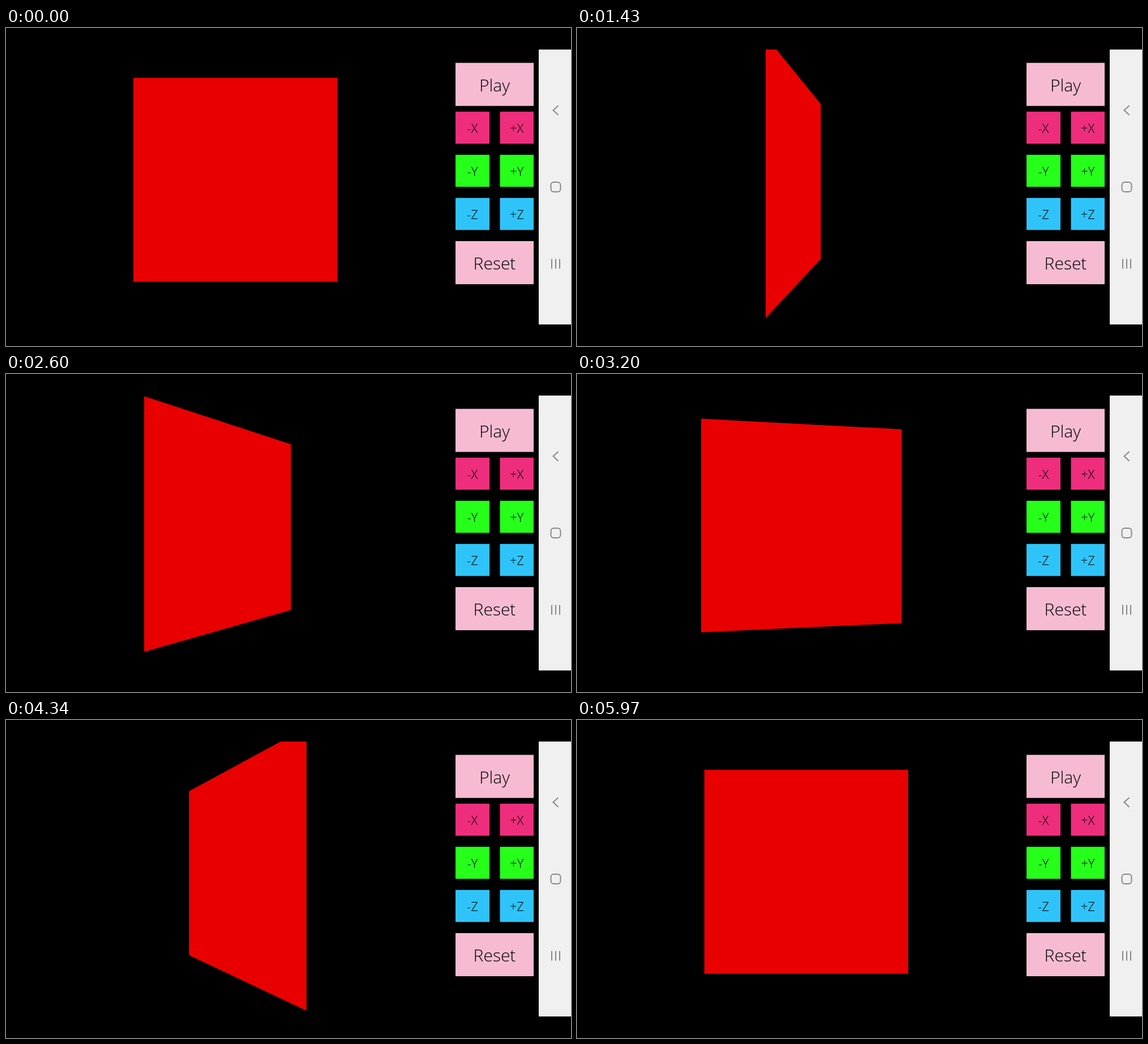
Animation of 998x561 px, one loop 6000 ms. Source, as an HTML page:

```html
<!DOCTYPE html>
<html lang="en">
<head>
<meta charset="utf-8">
<title>Rotating square</title>
<style>
  html, body { margin: 0; width: 100%; height: 100%; overflow: hidden; background: #000; }
  svg { display: block; }
  text { font: 300 22px "Open Sans", "Noto Sans", sans-serif; text-anchor: middle; }
  .big { font-size: 30px; }
  .icons { fill: none; stroke: #878787; stroke-width: 2; }
</style>
</head>
<body>
<svg width="998" height="561" viewBox="0 0 998 561">
  <clipPath id="screen"><rect y="38" width="941" height="485"/></clipPath>
  <g clip-path="url(#screen)"><polygon id="square" fill="#e80000"/></g>
  <g id="buttons"></g>
  <rect x="941" y="38" width="57" height="485" fill="#f0f0f1"/>
  <g class="icons">
    <path d="M975.5 137L966.5 145L975.5 153.5M964 407.5V424.5M971 407.5V424.5M978 407.5V424.5"/>
    <rect x="962.5" y="272" width="17" height="17" rx="5"/>
  </g>
</svg>
<script>
const LOOP = 6000;
const PIVOT = { x: 393, y: 280.3 };
const EDGE = { left: -168, right: 192, top: -192.3, bottom: 167.4 };
const DEPTH = 587;
// [time in ms, angle in degrees]
const KEYS = [
  [0, 0], [172, 0], [1480, 78], [2048, 78],
  [4745, -83], [5400, -83], [5400, 0], [LOOP, 0]
];

const square = document.getElementById("square");
const buttons = document.getElementById("buttons");

function addButton(label, x, y, w, h, color, baseline, cls = "") {
  buttons.insertAdjacentHTML("beforeend",
    `<rect x="${x}" y="${y}" width="${w}" height="${h}" fill="${color}"/>
     <text class="${cls}" x="${x + w / 2}" y="${baseline}">${label}</text>`);
}

addButton("Play", 794, 61.5, 138, 76, "#f6bbd3", 112, "big");
[["X", "#ee2e7c"], ["Y", "#26ff1a"], ["Z", "#2fc4f9"]].forEach(([axis, color], i) => {
  const y = 147.6 + 76.1 * i;
  addButton("-" + axis, 794, y, 60, 56.5, color, y + 37);
  addButton("+" + axis, 872.5, y, 59.5, 56.5, color, y + 37);
});
addButton("Reset", 794, 376, 138, 76, "#f6bbd3", 426, "big");

function angleAt(t) {
  const i = KEYS.findIndex(([time]) => time > t);
  const [t0, a0] = KEYS[i - 1], [t1, a1] = KEYS[i];
  return (a0 + (a1 - a0) * (t - t0) / (t1 - t0)) * Math.PI / 180;
}

function project(x, y, angle) {
  const scale = DEPTH / (DEPTH + x * Math.sin(angle));
  return [PIVOT.x + x * Math.cos(angle) * scale, PIVOT.y + y * scale];
}

function draw() {
  const angle = angleAt(performance.now() % LOOP);
  const { left, right, top, bottom } = EDGE;
  const corners = [[left, top], [right, top], [right, bottom], [left, bottom]];
  square.setAttribute("points", corners.map(([x, y]) => project(x, y, angle)).join(" "));
  requestAnimationFrame(draw);
}
draw();
</script>
</body>
</html>
```
